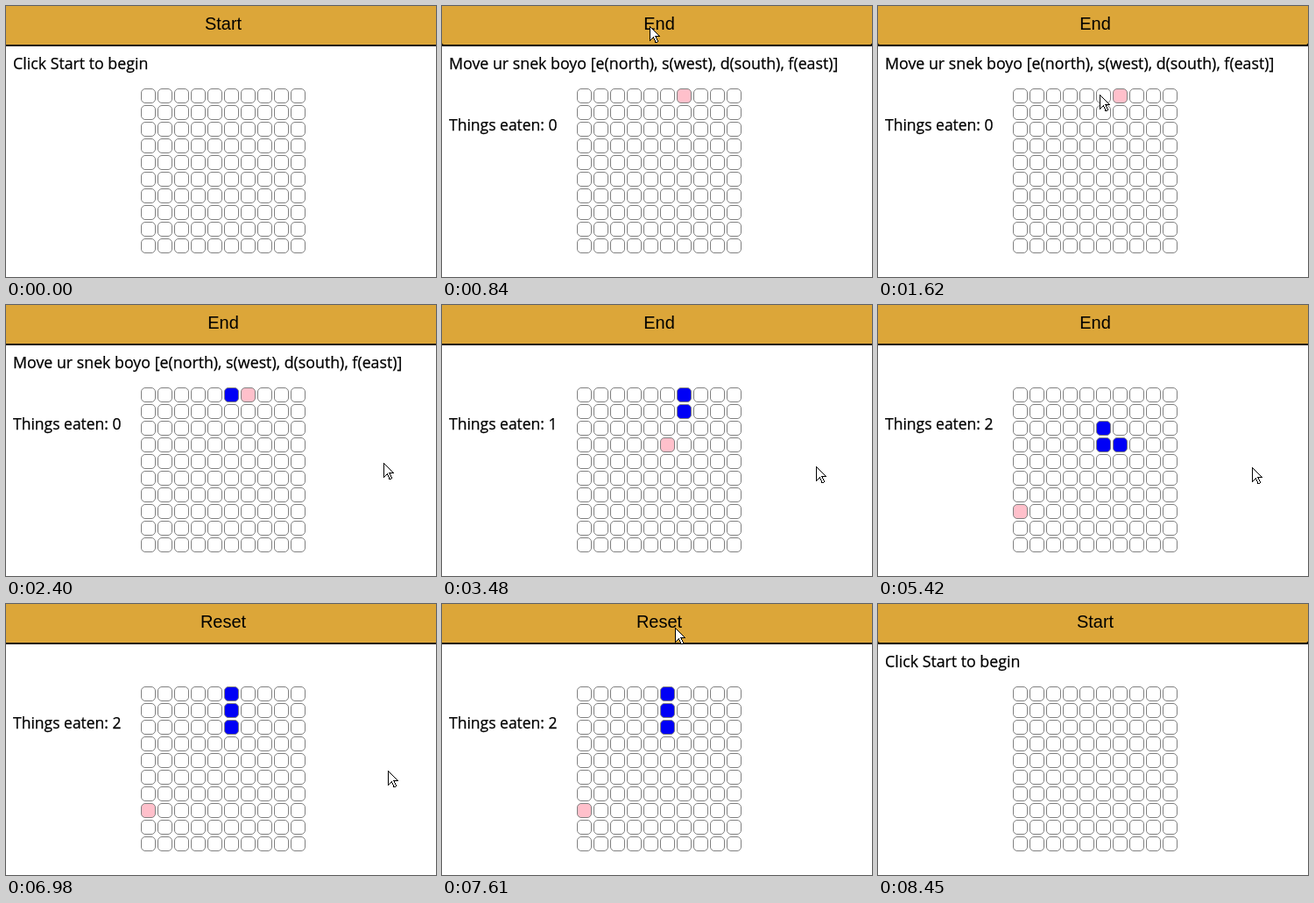
Write an HTML page that moves like this. It is 491 by 309 pixels and loops after 8.53 s.

```html
<!DOCTYPE html>
<html lang="en">
<head>
<meta charset="utf-8">
<title>Snek</title>
<style>
  html, body { margin: 0; width: 100%; height: 100%; overflow: hidden; background: #fff; }
  #stage { position: relative; width: 491px; height: 309px; overflow: hidden; background: #fff; color: #000; }
  #stage > * { position: absolute; }
  #button {
    left: -2px; top: -4px; width: 491px; height: 48px;
    border: 2px solid #1b1316; border-top: 0;
    background: #dca639;
    font: 20px/48px "Liberation Sans", Arial, sans-serif;
    text-align: center; text-indent: 5px;
  }
  #button.focused { border-color: #000; border-radius: 0 0 4px 4px; }
  .label {
    left: 8px; white-space: pre;
    font: 17.8px/24px "Open Sans", "Noto Sans", sans-serif;
    -webkit-text-stroke: .25px #000;
  }
  #prompt { top: 53px; }
  #score { top: 123px; font-size: 17.5px; }
  #board {
    left: 154px; top: 94px;
    display: grid; grid: repeat(10, 17px) / repeat(10, 17px); gap: 2px;
  }
  #board i { box-sizing: border-box; border: 1px solid #808080; border-radius: 5px; }
  #board .food { background: #ffc0cb; }
  #board .snake { background: #0000f6; }

  /* One second per update; the script sets the delay to pick the pose. */
  #cursor { animation: wander 110s ease-in-out both paused; }
  @keyframes wander {
    0%, .91% { left: 430px; top: 240px; }
    9.09%, 12.73% { left: 237px; top: 23px; }
    17.27%, 20% { left: 253px; top: 101px; }
    22.73%, 23.64% { left: 242px; top: 89px; }
    28.18% { left: 431px; top: 180px; }
    32.73% { left: 427px; top: 184px; }
    69.09% { left: 427px; top: 185px; }
    70.91%, 81.82% { left: 436px; top: 190px; }
    89.09%, 93.64% { left: 266px; top: 27px; }
    99.09%, 100% { left: 463px; top: 324px; }
  }
</style>
</head>
<body>
<div id="stage">
  <div id="button"></div>
  <div id="prompt" class="label"></div>
  <div id="score" class="label"></div>
  <div id="board"></div>
  <svg id="cursor" width="13" height="20" shape-rendering="crispEdges">
    <path d="M.5 .5V16.5L4.5 12.5L7 18.5H8.5L9.5 17.5L7 11.5H11.5Z" fill="#fff" stroke="#000"/>
  </svg>
</div>
<script>
const LOOP = 8530, UPDATES = 110;
const START = 11, BLUR = 23, PROMPT_OFF = 33, RESET = 100;
const FIRST_TICK = 38.1, TICK = 6.375;

// Keys pressed on each game tick; the step after the last leaves the board.
const keys = "fdddseee";
const stride = { e: -10, s: -1, d: 10, f: 1 };
const foods = [6, 35, 70];

const $ = id => document.getElementById(id);
const between = (n, from, to) => n >= from && n < to;
const cells = Array.from({ length: 100 }, () => $("board").appendChild(document.createElement("i")));

function play(ticks) {
  const trail = [5];
  let eaten = 0;
  for (const key of keys.slice(0, ticks)) {
    trail.push(trail.at(-1) + stride[key]);
    if (trail.at(-1) === foods[eaten]) eaten++;
  }
  return { eaten, snake: trail.slice(-1 - eaten), over: ticks > keys.length };
}

function setText(id, text) {
  if ($(id).textContent !== text) $(id).textContent = text;
}

function draw(update) {
  const playing = between(update, START, RESET);
  const ticks = Math.max(0, Math.floor((update - FIRST_TICK) / TICK) + 1);
  const { eaten, snake, over } = play(ticks);

  setText("button", !playing ? "Start" : over ? "Reset" : "End");
  $("button").classList.toggle("focused", between(update, START, BLUR) || update >= RESET);
  setText("prompt", !playing ? "Click Start to begin"
    : update < PROMPT_OFF ? "Move ur snek boyo [e(north), s(west), d(south), f(east)]" : "");
  setText("score", playing ? `Things eaten: ${eaten}` : "");

  cells.forEach((cell, i) => {
    cell.className = !playing ? ""
      : update >= BLUR && snake.includes(i) ? "snake"
      : i === foods[eaten] ? "food" : "";
  });

  $("cursor").style.animationDelay = `${-update}s`;
  $("cursor").style.visibility = between(update, 2, UPDATES - 1) ? "visible" : "hidden";
}

const began = performance.now();
function tick() {
  const time = (performance.now() - began) % LOOP;
  // Updates come slightly ahead of an even beat.
  draw(Math.min(UPDATES - 1, Math.floor((time + 25) / LOOP * UPDATES)));
  requestAnimationFrame(tick);
}
tick();
</script>
</body>
</html>
```
